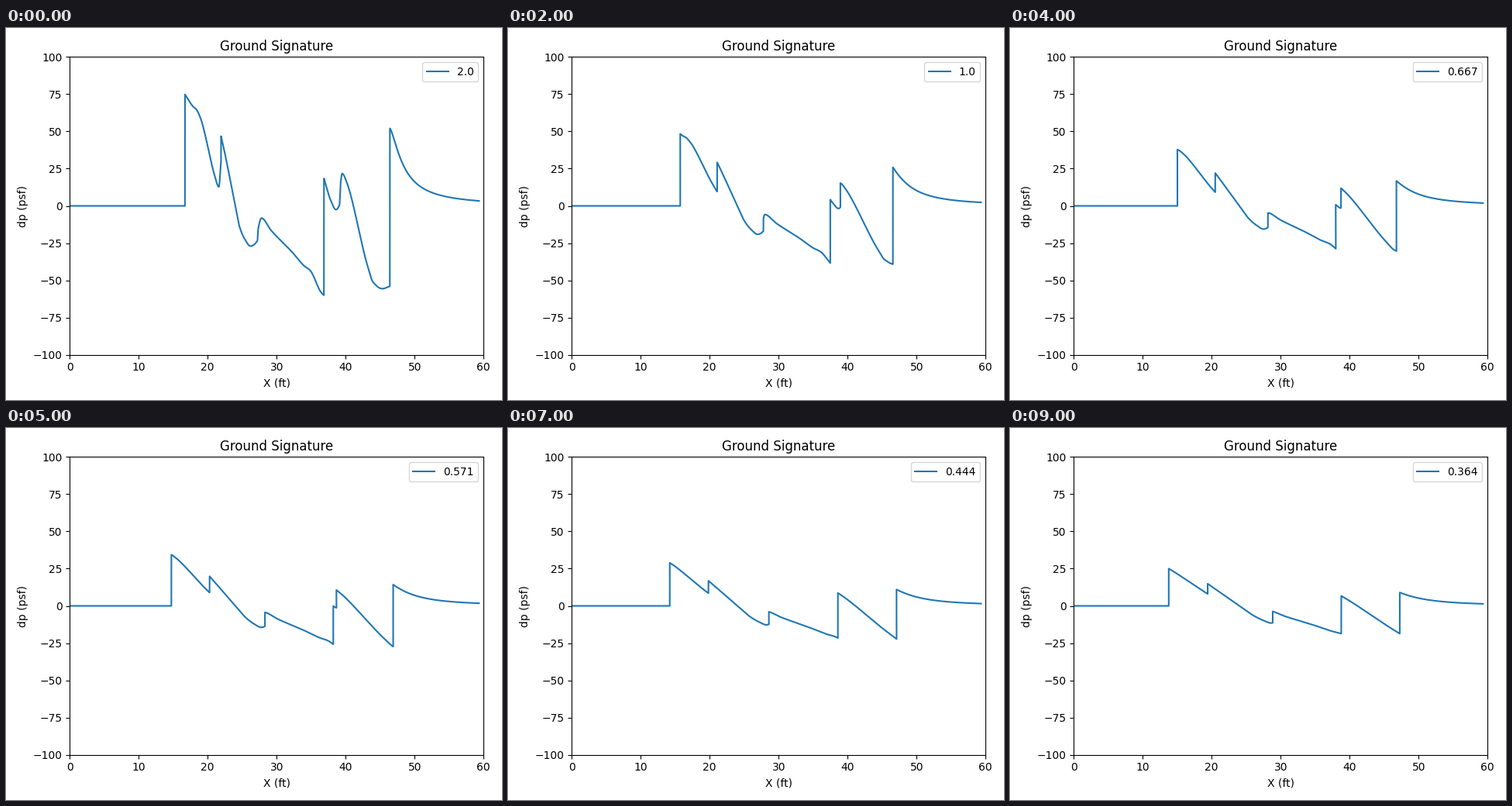
These frames come from a looping animation (640 by 480 pixels, 10000 ms). A matplotlib script:

```python
import matplotlib.pyplot as plt
import numpy as np
from matplotlib.animation import FuncAnimation

STEPS = 10
STEEPEN = 0.066   # how fast pressure skews the wave
X_END = 59.35

# Key points (ft, psf) of the near-field wave between its shocks
NOSE = [(16.71, 74.8), (17.9, 66.6), (18.35, 64.8), (19, 58.4), (19.4, 52),
        (21, 20.5), (21.62, 12.8), (21.93, 30)]
BODY = [(21.94, 46.8), (22.4, 37.3), (24.3, -6.9), (24.6, -13.7),
        (25.3, -21.7), (26.2, -27), (27.2, -23.5), (27.32, -15.5),
        (27.8, -8.2), (29.2, -16.5), (32.2, -30.8), (33.9, -39.9),
        (34.9, -43.6), (36.4, -57.8), (36.85, -60)]
WING = [(36.86, 18.4), (37.84, 3.7), (38.6, -2.5), (39.1, 0.5),
        (39.3, 16.5), (39.5, 21.7), (40.1, 16.6), (43.15, -39.8),
        (44, -51.3), (45.3, -55.6), (46.41, -54)]


def smooth(points, x):
    """Monotone cubic curve through the points."""
    px, py = np.array(points, float).T
    d = np.diff(py) / np.diff(px)
    same = d[:-1] * d[1:] > 0
    total = np.where(same, d[:-1] + d[1:], 1)
    inner = np.where(same, 2 * d[:-1] * d[1:] / total, 0)
    m = np.concatenate([d[:1], inner, d[-1:]])
    i = np.clip(np.searchsorted(px, x, side="right") - 1, 0, len(d) - 1)
    h = px[i + 1] - px[i]
    t = (x - px[i]) / h
    ease = t * t * (3 - 2 * t)
    bend = t * (1 - t) * (m[i] * (1 - t) - m[i + 1] * t)
    return py[i] + (py[i + 1] - py[i]) * ease + h * bend


def near_field(x):
    p = np.zeros_like(x)
    for points in (NOSE, BODY, WING):
        part = (x >= points[0][0]) & (x <= points[-1][0])
        p[part] = smooth(points, x[part])
    tail = x > WING[-1][0]
    p[tail] = 52 / (1 + 0.337 * (x[tail] - WING[-1][0]) ** 1.47)
    return p


def upper_hull(x, y):
    """Indices of the upper concave hull of the points."""
    hull = []
    for i in range(len(x)):
        while len(hull) > 1:
            a, b = hull[-2:]
            if (y[b] - y[a]) * (x[i] - x[b]) > (y[i] - y[b]) * (x[b] - x[a]):
                break
            hull.pop()
        hull.append(i)
    return hull


xs = np.round(np.arange(6101) / 100, 2)
p0 = near_field(xs)
area = np.concatenate([[0], np.cumsum((p0[1:] + p0[:-1]) / 2 * np.diff(xs))])


def signature(step):
    """Skew and weaken the wave; the hull gives equal-area shocks."""
    spread = np.sqrt(1 + step / 2)
    skew = STEEPEN * (spread - 1)
    keep = slice(None)
    if skew > 0:
        potential = area - xs ** 2 / (2 * skew)
        keep = upper_hull(xs.tolist(), potential.tolist())
    x = xs[keep] - skew * p0[keep]
    p = p0[keep] / spread
    inside = x <= X_END
    return x[inside], p[inside]


fig, ax = plt.subplots(figsize=(6.4, 4.8), dpi=100)
line, = ax.plot([], [], label="2.0")
ax.set(xlim=(0, 60), ylim=(-100, 100), title="Ground Signature",
       xlabel="X (ft)", ylabel="dp (psf)")
label = ax.legend(loc="upper right").get_texts()[0]
fig.tight_layout()

waves = [signature(k) for k in range(STEPS)]


def update(step):
    line.set_data(*waves[step])
    label.set_text(str(round(4 / (step + 2), 3)))
    return line, label


anim = FuncAnimation(fig, update, frames=STEPS, interval=1000, repeat=True)
plt.show()
```
